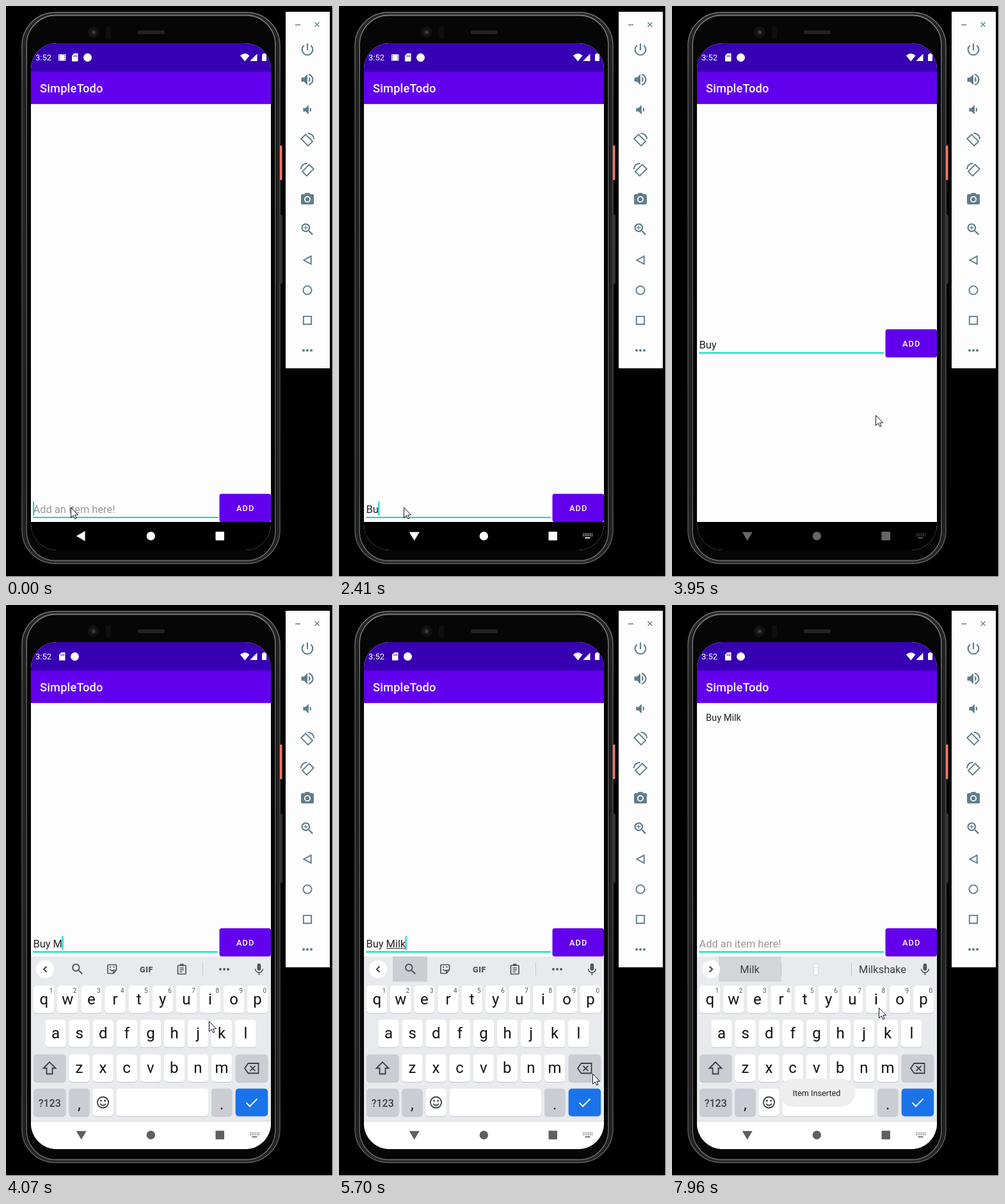
These frames come from a looping animation (511 by 892 pixels, 8000 ms). An HTML page:

```html
<!DOCTYPE html>
<html lang="en">
<head>
<meta charset="utf-8">
<title>Todo app demo</title>
<style>
html, body { margin: 0; width: 100%; height: 100%; overflow: hidden; background: #000; }
svg { display: block; width: 511px; height: 892px; font-family: Roboto, sans-serif; }
text { white-space: pre; }
.mid { text-anchor: middle; }
.line { fill: none; stroke-width: 2; }
</style>
</head>
<body>
<svg id="stage" viewBox="0 0 511 892" xmlns="http://www.w3.org/2000/svg">
  <defs>
    <clipPath id="glass"><rect x="39" y="58" width="375" height="792" rx="40"/></clipPath>
    <linearGradient id="metal" x2="0" y2="1">
      <stop offset="0" stop-color="#7a7a7a"/><stop offset=".15" stop-color="#555"/><stop offset=".85" stop-color="#4a4a4a"/><stop offset="1" stop-color="#666"/>
    </linearGradient>
    <path id="lens" d="M15.5 14h-.79l-.28-.27C15.41 12.59 16 11.11 16 9.5 16 5.91 13.09 3 9.5 3S3 5.91 3 9.5 5.91 16 9.5 16c1.61 0 3.09-.59 4.23-1.57l.27.28v.79l5 4.99L20.49 19l-4.99-5zm-6 0C7.01 14 5 11.99 5 9.5S7.01 5 9.5 5 14 7.01 14 9.5 11.99 14 9.5 14z"/>
    <path id="mic" d="M12 14c1.66 0 3-1.34 3-3V5c0-1.66-1.34-3-3-3S9 3.34 9 5v6c0 1.66 1.34 3 3 3zm5.3-3c0 3-2.54 5.1-5.3 5.1S6.7 14 6.7 11H5c0 3.41 2.72 6.23 6 6.72V21h2v-3.28c3.28-.48 6-3.3 6-6.72h-1.7z"/>
  </defs>
  <rect width="511" height="892"/>
  <path d="M510.5 0V892M0 891.5H511" stroke="#e8e8e8"/>

  <g id="body">
    <rect x="25" y="10" width="403" height="861" rx="52" fill="#1f1f1f" stroke="url(#metal)" stroke-width="1.500"/>
    <rect x="28.500" y="12.500" width="396" height="856" rx="49" fill="#121212" stroke="#2c2c2c" stroke-width="1.500"/>
    <rect x="32" y="14.500" width="389" height="852" rx="46" fill="#060606" stroke="url(#metal)" stroke-width="1.800"/>
    <rect x="428" y="218" width="3.500" height="54" rx="1" fill="#f57864"/>
    <rect x="428" y="326" width="4" height="108" rx="1.500" fill="#333"/>
    <circle cx="136.500" cy="41" r="9" fill="#121212"/>
    <circle cx="136.500" cy="41" r="4.500" fill="#222"/>
    <circle cx="137" cy="41" r="2" fill="#444"/>
    <rect x="156" y="31" width="8" height="21" rx="4" fill="#0f0f0f"/>
    <rect x="206" y="38" width="42" height="6" rx="2.500" fill="#222"/>
  </g>

  <g clip-path="url(#glass)">
    <rect x="39" y="58" width="375" height="792" fill="#fdfdfd"/>
    <rect x="39" y="58" width="375" height="45" fill="#3700b3"/>
    <rect x="39" y="102.500" width="375" height="50.500" fill="#6200ee"/>
    <rect x="39" y="153" width="375" height="1" fill="#d9d4e2"/>
    <g fill="#fff">
      <text x="46" y="85" font-size="13">3:52</text>
      <path id="film" fill-rule="evenodd" d="M82 75.500h11.500v10h-11.500zM83 77v1.500h1.200V77zm0 3v1.500h1.200V80zm0 3v1.500h1.200V83zm8.300-6v1.500h1.200V77zm0 3v1.500h1.200V80zm0 3v1.500h1.200V83z"/>
      <g id="notes">
        <path fill-rule="evenodd" d="M106.500 74h6v12.500h-9.500v-9zM105.500 77v2.500h1V77zm2.200 0v2.500h1V77zm2.200 0v2.500h1V77z"/>
        <circle cx="127.500" cy="80.500" r="6.500"/>
      </g>
      <path d="M366 77.500Q373.300 71 380.500 77.500L373.300 86.500zM382 86V85L392.500 74.500V86zM400 76.200a1 1 0 0 1 1-1h1V74h3v1.200h1a1 1 0 0 1 1 1V85a1 1 0 0 1-1 1h-5a1 1 0 0 1-1-1z"/>
      <text x="53" y="135" font-size="18.240" font-weight="500" letter-spacing=".2">SimpleTodo</text>
    </g>
    <text id="item" x="53" y="181" font-size="14.600" fill="#222">Buy Milk</text>

    <g id="bar">
      <text id="hint" x="42.500" y="791.500" font-size="16.420" fill="#999">Add an item here!</text>
      <text id="typed" x="42.500" y="791.500" font-size="16.420" fill="#222"></text>
      <rect id="mark" y="793" height="1" fill="#333"/>
      <rect id="caret" y="774" width="2" height="22" fill="#03dac5"/>
      <rect x="42" y="798" width="289" height="2" fill="#03dac5"/>
      <rect id="button" x="333.500" y="762" width="80.500" height="44" rx="3.500"/>
      <text x="374.300" y="789" class="mid" font-size="12.770" font-weight="500" letter-spacing="1.140" fill="#fff">ADD</text>
    </g>

    <rect id="navBack" x="39" y="806" width="375" height="44"/>
    <g id="board">
      <rect x="39" y="549" width="375" height="258" fill="#e8eaed"/>
      <g id="keys"></g>
      <g id="tools">
        <rect id="pick" x="84" y="549" width="54" height="39.500" fill="#cbcdd2"/>
        <use href="#lens" transform="translate(100.300 557.500) scale(.95)" fill="#50545a"/>
        <g class="line" stroke="#50545a" style="stroke-width:1.700">
          <path d="M160 562h11.500a1 1 0 0 1 1 1v7l-4.500 5.500h-8a1 1 0 0 1-1-1V563a1 1 0 0 1 1-1zM168 575v-4.500h4.500M162.500 569q2.500 4 5.500 1"/>
          <rect x="268.500" y="563" width="12.500" height="13.500" rx="1"/>
          <path d="M271.500 562.800h6.500M271.500 567h6.500M271.500 570h6.500M271.500 573h4"/>
        </g>
        <path d="M162 564.500h2v2h-2zM167.500 564.500h2v2h-2zM272 560.500h5.500v3.500h-5.500z" fill="#50545a"/>
        <text x="219.500" y="573.500" class="mid" font-size="12.500" font-weight="900" letter-spacing=".6" fill="#50545a">GIF</text>
        <path d="M307.500 559V579" stroke="#c6c8cc"/>
        <g fill="#50545a"><circle cx="335" cy="569" r="1.900"/><circle cx="341" cy="569" r="1.900"/><circle cx="347" cy="569" r="1.900"/></g>
      </g>
      <g id="words">
        <rect x="73" y="549" width="97.500" height="39.500" fill="#d3d5d9"/>
        <path d="M170.500 559V580M280.500 559V580" stroke="#bfc1c5"/>
        <g font-size="16.400" fill="#3c4043" class="mid"><text x="121.500" y="575">Milk</text><text x="329" y="575">Milkshake</text></g>
        <path d="M220.500 561h9l-.8 17h-7.400z" fill="#f7f7f7" stroke="#d4d6d8"/>
        <path d="M221 566h8" stroke="#dadada"/>
      </g>
      <circle cx="61" cy="569" r="14" fill="#fff"/>
      <path id="arrow" class="line" stroke="#444" d="M63.500 564.500L59 569l4.500 4.500"/>
      <use href="#mic" transform="translate(384 558) scale(.95)" fill="#50545a"/>
      <path d="M39 806.500H414" stroke="#d8dadd"/>
    </g>

    <g id="toast">
      <rect x="167" y="740" width="119" height="44" rx="22" fill="#eee"/>
      <text x="226" y="767" class="mid" font-size="12.700" fill="#222">Item Inserted</text>
    </g>

    <g id="nav">
      <path id="back" d="M110 828L123.500 820V836z"/>
      <circle cx="226.300" cy="828" r="6.700"/>
      <rect x="327.500" y="821.300" width="13.500" height="13.500" rx="1"/>
      <g id="dots"></g>
    </g>
  </g>

  <g id="panel">
    <rect x="437" y="9" width="69" height="557" fill="#fdfdfd"/>
    <path d="M452 29.500h8M482.500 25.500l7 7M489.500 25.500l-7 7" stroke="#607d8b" stroke-width="1.300"/>
    <g id="icons" fill="#607d8b"></g>
  </g>
  <path id="pointer" d="M.5.500V16.300L4.200 12.900 6.700 18.200 9 17.200 6.600 12H11.600z" fill="#fff" stroke="#14142a"/>
</svg>

<script>
const LOOP = 8000;
const $ = id => document.getElementById(id);
const show = (id, on) => $(id).setAttribute('display', on ? 'inline' : 'none');
const set = (id, attrs) => { for (const k in attrs) $(id).setAttribute(k, attrs[k]); };

function icon(y, art, scale = 0.95) {
  return `<g transform="translate(471 ${y}) scale(${scale}) translate(-12 -12)">${art}</g>`;
}
const fill = d => `<path fill-rule="evenodd" d="${d}"/>`;
const line = d => `<path d="${d}" class="line" stroke="#607d8b"/>`;
const turn = line('M9 3.200L20.500 14.700 13.200 22 1.700 10.500z') + line('M12.500 1.200Q21.800 2 22.800 11');

$('icons').innerHTML =
  icon(68, line('M12 3V13M7 5.900A8 8 0 1 0 17 5.900'), 1.05) +
  icon(115, fill('M3 9v6h4l5 5V4L7 9zM14 8v8q2.500-1.400 2.500-4T14 8zM14 3.200v2.100c2.900.9 5 3.500 5 6.700s-2.100 5.800-5 6.700v2.100c4-.9 7-4.500 7-8.800s-3-7.900-7-8.800z'), 1.05) +
  icon(162, fill('M5 9v6h4l5 5V4L9 9zM16 8v8q2.500-1.400 2.500-4T16 8z')) +
  icon(209, turn) +
  icon(256, `<g transform="matrix(-1 0 0 1 24 0)">${turn}</g>`) +
  icon(302, fill('M9 2L7.200 4H4a2 2 0 0 0-2 2v12a2 2 0 0 0 2 2h16a2 2 0 0 0 2-2V6a2 2 0 0 0-2-2h-3.200L15 2zM12 7a5 5 0 1 1 0 10a5 5 0 1 1 0-10z') + '<circle cx="12" cy="12" r="3.200"/>', 1) +
  icon(349, '<use href="#lens"/>' + fill('M12.500 10.100h-2.400v2.400H8.900v-2.400H6.500V8.900h2.400V6.500h1.200v2.400h2.400z'), 1.05) +
  icon(397, line('M18 5.500V18.500L6 12z')) +
  icon(444, '<circle cx="12" cy="12" r="7" class="line" stroke="#607d8b"/>') +
  icon(491, line('M5.500 5.500h13v13h-13z')) +
  [465, 471, 477].map(x => `<circle cx="${x}" cy="538" r="2.100"/>`).join('');

function key(x, y, w, label = '', color = '#fff', size = 24, dy = 29) {
  return `<rect x="${x}" y="${y + 1}" width="${w}" height="43" rx="5" fill="#c2c4c9"/>` +
    `<rect x="${x}" y="${y}" width="${w}" height="43" rx="5" fill="${color}"/>` +
    `<text x="${x + w / 2}" y="${y + dy}" class="mid" font-size="${size}" fill="#111">${label}</text>`;
}
const row = (letters, x, y) =>
  [...letters].map((c, i) => key(x + i * 37.1, y, 32.4, c)).join('');
const GREY = '#cacdd4';
const glyph = d => `<path d="${d}" class="line" stroke="#3c4043" style="stroke-width:1.800"/>`;

$('keys').innerHTML =
  row('qwertyuiop', 43, 594.5) + row('asdfghjkl', 61.3, 648) + row('zxcvbnm', 98.2, 702) +
  [...'1234567890'].map((c, i) =>
    `<text x="${70.5 + i * 37.1}" y="606" class="mid" font-size="10" fill="#555">${c}</text>`).join('') +
  key(43, 702, 50.5, '', GREY) + key(358.7, 702, 50.5, '', GREY) +
  key(43, 755.5, 50.5, '<tspan font-weight="500" fill="#3c4043">?123</tspan>', GREY, 16, 28) +
  key(98.2, 755.5, 32.4, ',', GREY, 24, 32) + key(135.3, 755.5, 32.4) + key(172.4, 755.5, 144) +
  key(321, 755.5, 32.4, '.', GREY, 24, 32) + key(358.7, 755.5, 50.5, '', '#1a73e8') +
  glyph('M68 714L58.500 723.500H63.500V732.500H72.500V723.500H77.500z') +
  glyph('M378.500 716H394.500V731.500H378.500L373 723.700zM381.500 719.800l8 8M389.500 719.800l-8 8') +
  glyph('M151.500 768.500a8.500 8.500 0 1 0 .01 0M147 779q4.500 5.500 9 0') +
  '<circle cx="148.500" cy="774.500" r="1.400" fill="#3c4043"/><circle cx="154.500" cy="774.500" r="1.400" fill="#3c4043"/>' +
  '<path d="M375.500 777.500L381 783 392.500 771.500" class="line" stroke="#fff"/>';

$('dots').innerHTML = [0, 1].map(r => [0, 1, 2, 3, 4, 5].map(c =>
  `<rect x="${381.3 + c * 2.7}" y="${824 + r * 2.8}" width="1.400" height="1.500"/>`).join('')).join('') +
  '<rect x="384.500" y="830" width="8" height="1.700"/>';

// Each entry changes part of the state from its time on.
const START = {
  text: '', caret: 1, pos: [101, 783], dots: 0, turn: 0, film: 1, up: 0, dim: 0,
  board: 0, pick: 0, words: 0, mark: 0, press: 0, item: 0, toast: 0
};
const STEPS = [
  [140, { dots: 1 }],
  [390, { caret: 0 }],
  [1190, { caret: 1 }],
  [1640, { text: 'B' }],
  [2010, { turn: -45, caret: 0 }],
  [2130, { turn: -90 }],
  [2410, { text: 'Bu', caret: 1 }],
  [2550, { text: 'Buy' }],
  [2670, { film: 0 }],
  [2790, { up: 1, dim: 0.5 }],
  [2910, { dim: 1 }],
  [3410, { pos: [232, 698] }],
  [3530, { pos: [318, 639] }],
  [3950, { caret: 0 }],
  [4070, { text: 'Buy M', caret: 1, board: 1, pos: [317, 650] }],
  [4190, { pick: 1, mark: 5, pos: [315, 663] }],
  [4350, { pos: [314, 664] }],
  [4500, { text: 'Buy Mi', mark: 6, pos: [359, 680] }],
  [4650, { text: 'Buy Mil', mark: 7, pos: [358, 735] }],
  [4770, { pos: [359, 775] }],
  [4920, { text: 'Buy Milk', pos: [363, 795] }],
  [5040, { pos: [366, 805] }],
  [5440, { mark: 8, pos: [369, 805] }],
  [5560, { pos: [371, 802] }],
  [5700, { pos: [396, 732] }],
  [5820, { words: 1, pos: [395, 650] }],
  [5950, { pos: [388, 570] }],
  [6070, { pos: [382, 518] }],
  [6190, { pos: [380, 509] }],
  [6460, { caret: 0, press: 1 }],
  [6720, { text: '', mark: 0, caret: 1 }],
  [6840, { item: 1, press: 0 }],
  [7100, { caret: 0, pos: [371, 530] }],
  [7250, { pos: [323, 629], toast: 0.3 }],
  [7400, { caret: 1, toast: 0.6 }],
  [7530, { toast: 0.85 }],
  [7680, { toast: 1 }],
  [7960, { caret: 0 }]
];

function stateAt(t) {
  const s = { ...START };
  for (const [at, change] of STEPS) if (t >= at) Object.assign(s, change);
  return s;
}

const typed = $('typed');
const widthTo = n => n ? typed.getSubStringLength(0, n) : 0;

function draw(t) {
  const s = stateAt(t);
  typed.textContent = s.text;
  show('hint', !s.text);
  show('caret', s.caret);
  set('caret', { x: 42 + widthTo(s.text.length) });
  show('mark', s.mark);
  if (s.mark) set('mark', { x: 42.5 + widthTo(4), width: widthTo(s.mark) - widthTo(4) });
  set('bar', { transform: `translate(0 ${s.up ? -257 : 0})` });
  set('button', { fill: s.press ? '#7821f0' : '#6200ee' });
  show('film', s.film);
  set('notes', { transform: `translate(${s.film ? 0 : -20} 0)` });
  show('item', s.item);
  show('board', s.board);
  show('pick', s.pick);
  show('tools', !s.words);
  show('words', s.words);
  set('arrow', { transform: s.words ? 'rotate(180 61 569)' : '' });
  set('toast', { opacity: s.toast });
  set('navBack', { fill: s.board ? '#fff' : '#000' });
  set('nav', { fill: s.board ? '#5f5f5f' : ['#fff', '#aaa', '#666'][s.dim * 2] });
  set('back', { transform: `rotate(${s.turn} 117.500 827.800)` });
  show('dots', s.dots);
  set('pointer', { transform: `translate(${s.pos})` });
}

function tick() {
  draw(performance.now() % LOOP);
  requestAnimationFrame(tick);
}
tick();
</script>
</body>
</html>
```
